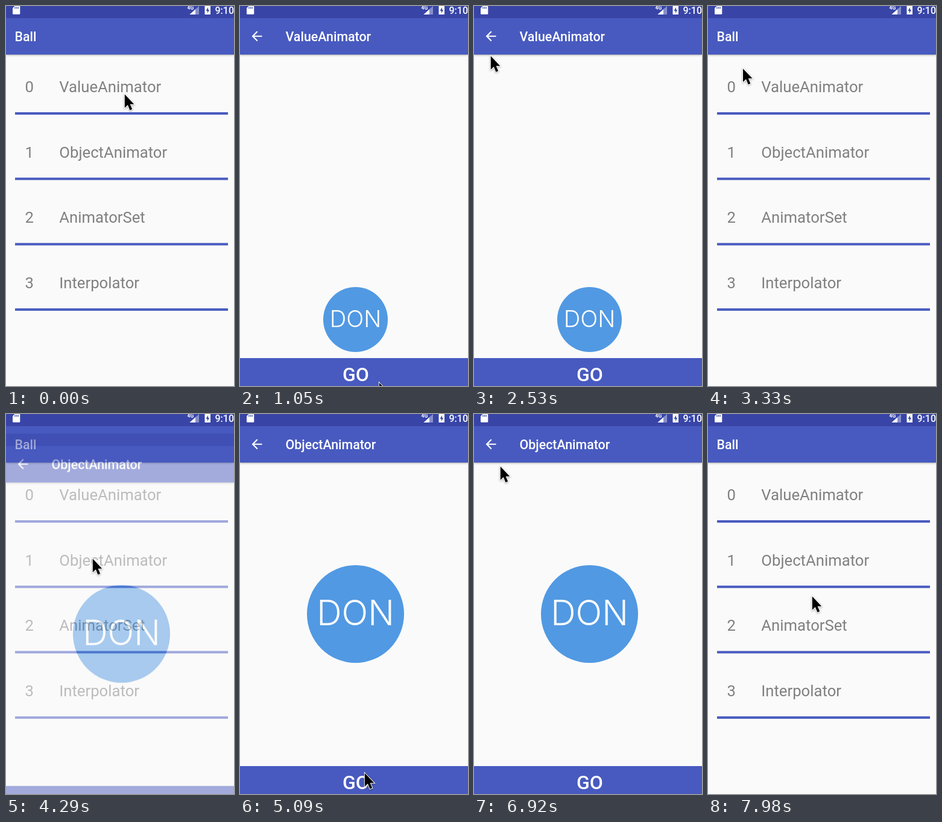
These frames come from a looping animation (378x626 px, 8 s). An HTML page:

```html
<!DOCTYPE html>
<html lang="en">
<head>
<meta charset="utf-8">
<title>Ball</title>
<style>
html, body { margin: 0; width: 100%; height: 100%; overflow: hidden; background: #fafafa; }
#stage { position: relative; width: 378px; height: 626px; overflow: hidden; font-family: Roboto, sans-serif; }
.layer { position: absolute; left: 0; top: 0; width: 378px; height: 626px; background: #fafafa; }
svg { position: absolute; left: 0; top: 0; overflow: visible; }
.bar { position: absolute; left: 0; top: 0; width: 378px; height: 80px; background: #485abf; box-shadow: 0 1px 3px rgba(0,0,0,.35); }
.bar::before { content: ""; position: absolute; left: 0; top: 0; width: 100%; height: 20px; background: #3845a7; }
.title { font-size: 21.4px; font-weight: 500; fill: #fff; }
.item { font-size: 25.7px; fill: #808080; }
#go { position: absolute; left: 0; top: 579.5px; width: 378px; height: 47px; background: #485abf; }
.ball { position: absolute; left: 111.25px; top: 249.25px; width: 161px; height: 161px; border-radius: 50%; background: #5199e3; color: #fff;
  font: 350 57.5px/157px Inter, sans-serif; text-align: center; }
</style>
</head>
<body>
<div id="stage">
  <div class="layer">
    <div class="bar"></div>
    <svg id="list" width="378" height="626"><text class="title" x="14.5" y="58">Ball</text></svg>
  </div>
  <div class="layer" id="detail">
    <div class="bar"></div>
    <div id="go"></div>
    <svg width="378" height="626">
      <text class="title" id="name" x="75.5" y="58"></text>
      <path transform="translate(15.3 37) scale(1.06)" fill="#fff" d="M20 11H7.83l5.59-5.59L12 4l-8 8 8 8 1.41-1.41L7.83 13H20z"/>
      <text x="192" y="618" text-anchor="middle" font-size="32" font-weight="500" fill="#fff">GO</text>
    </svg>
    <div class="ball" id="ball">DON</div>
  </div>
  <svg width="378" height="626">
    <g fill="#fff">
      <path d="M14.5 0H22q1.3 0 1.3 1.3V12.5q0 1.3-1.3 1.3H12.3q-1.3 0-1.3-1.3V3.5z"/>
      <path d="M15 1.5v3M17.6 1.5v3M20.2 1.5v3" stroke="#3845a7" stroke-width="1.3"/>
      <path d="M320 0V14H304.5z" opacity=".4"/>
      <path d="M314 5.5V14H304.5z"/>
      <text x="300.5" y="6" font-size="8.5" font-weight="700">4G</text>
      <path d="M329.5 0H339V14H329.5z"/>
      <path d="M335 2L331.5 8H333.8V12L337.2 6.2H335z" fill="#3845a7"/>
      <text x="346.5" y="13" font-size="16" font-weight="500">9:10</text>
    </g>
    <g id="cursor">
      <path transform="translate(.8 1.6) scale(.9)" d="M0 0V24.5L5.6 19.4 9.6 29 13.8 27.2 9.8 17.9H17.3z" stroke="#fff" stroke-width="2.2"
        paint-order="stroke" style="filter:drop-shadow(0 1.5px 1.5px rgba(0,0,0,.35))"/>
    </g>
  </svg>
</div>
<script>
const LOOP = 8000, SHIFT = 52;
const $ = id => document.getElementById(id);
const clamp = v => Math.max(0, Math.min(1, v));
const part = (t, start, dur) => clamp((t - start) / dur);
const smooth = p => (1 - Math.cos(Math.PI * p)) / 2;

['ValueAnimator', 'ObjectAnimator', 'AnimatorSet', 'Interpolator'].forEach((label, i) => {
  const y = 142 + i * 107.7;
  $('list').insertAdjacentHTML('beforeend',
    `<text class="item" x="31.5" y="${y}">${i}</text><text class="item" x="88.3" y="${y}">${label}</text>` +
    `<rect x="15" y="${y + 33}" width="353" height="4" fill="#4a5bc0"/>`);
});

// The ball is thrown up and falls back
function toss(t) {
  const p = part(t, 1480, 1000);
  return `translateY(${187 - 1508 * p * (1 - p)}px) scale(.665)`;
}

function spin(t) {
  return `perspective(212px) rotateY(${-360 * smooth(part(t, 5545, 1170))}deg)`;
}

const visits = [
  { name: 'ValueAnimator', open: 410, close: 3030, pose: toss },
  { name: 'ObjectAnimator', open: 4260, close: 7320, pose: spin }
];

// Pointer trips; bend makes x lead and y lag
const START = { x: 196, y: 144 };
const trips = [
  { from: 400, to: 1050, x: 230, y: 619 },
  { from: 1130, to: 1310, x: 206, y: 592 },
  { from: 1500, to: 2530, x: 27, y: 81 },
  { from: 2530, to: 2720, x: 22, y: 46 },
  { from: 3030, to: 3860, x: 143, y: 237 },
  { from: 4290, to: 5090, x: 206, y: 590 },
  { from: 5450, to: 6300, x: 43, y: 85, bend: 2 },
  { from: 6920, to: 7180, x: 36, y: 60 },
  { from: 7330, to: 7980, x: 172, y: 299 }
];

function pointer(t) {
  let { x, y } = START;
  for (const trip of trips) {
    const p = smooth(part(t, trip.from, trip.to - trip.from));
    const bend = trip.bend || 1;
    x += (trip.x - x) * p ** (1 / bend);
    y += (trip.y - y) * p ** bend;
  }
  return [x, y];
}

function draw(now) {
  const t = now % LOOP;
  const v = visits[t < 4000 ? 0 : 1];
  const leaving = t >= v.close;
  const alpha = leaving ? 1 - part(t, v.close + 100, 150) : 1 - (1 - part(t, v.open, 200)) ** 4;
  const shift = leaving ? part(t, v.close, 250) ** 4 : (1 - part(t, v.open, 350)) ** 5;
  $('detail').style.opacity = alpha;
  $('detail').style.transform = `translateY(${SHIFT * shift}px)`;
  $('name').textContent = v.name;
  $('ball').style.transform = v.pose(t);
  $('cursor').setAttribute('transform', `translate(${pointer(t)})`);
}

const begin = performance.now();
function tick() {
  draw(performance.now() - begin);
  requestAnimationFrame(tick);
}
tick();
</script>
</body>
</html>
```
